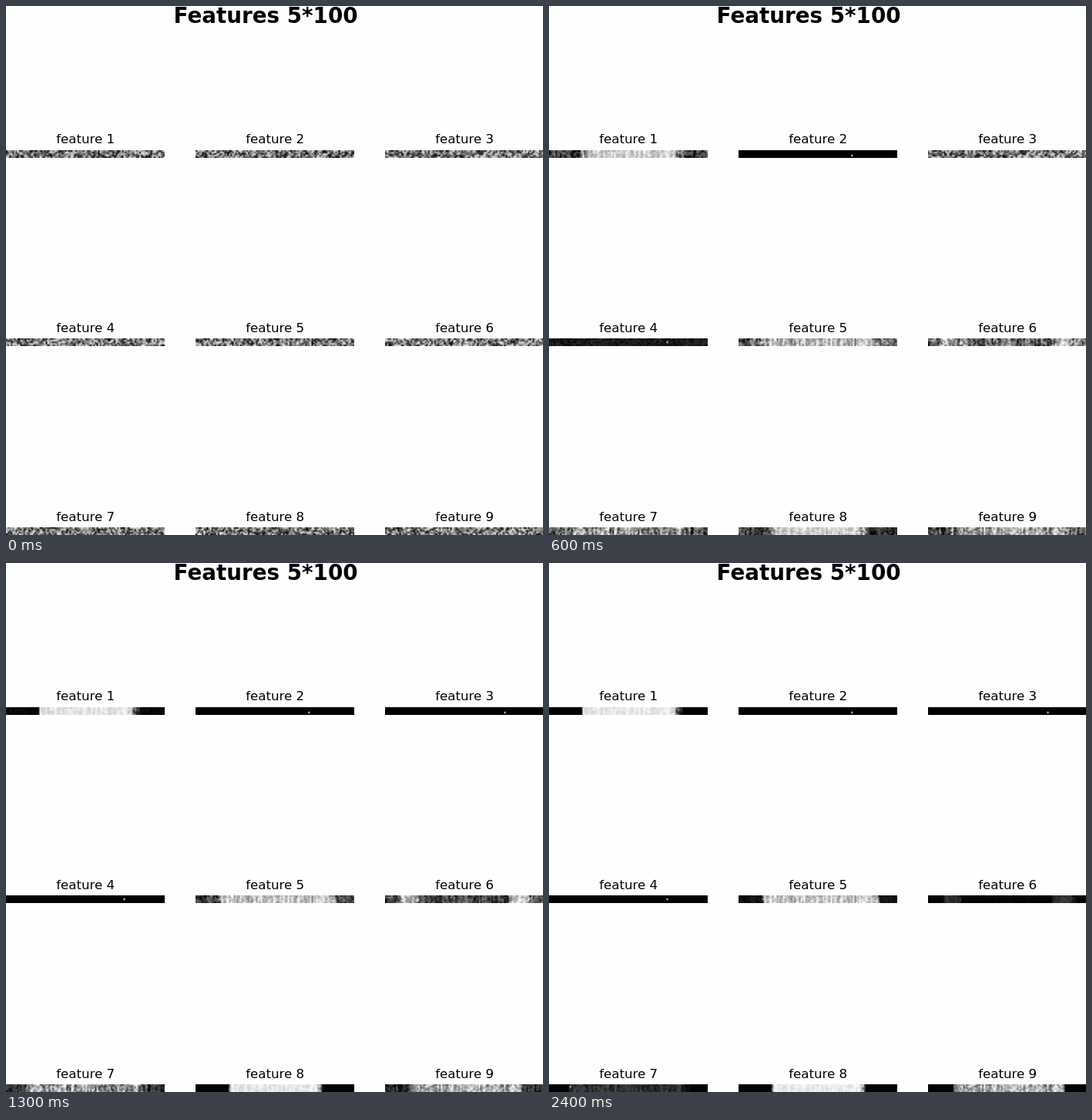
An HTML page with a canvas for the animation above (2500 ms loop, 697 by 686 pixels).

```html
<!DOCTYPE html>
<html lang="en">
<head>
<meta charset="utf-8">
<title>Features 5*100</title>
<style>
  html, body { margin: 0; width: 100%; height: 100%; overflow: hidden; background: #fefefe; }
  canvas, svg { position: absolute; left: 0; top: 0; width: 697px; height: 686px; }
  text { font: 16.667px "DejaVu Sans", sans-serif; text-anchor: middle; fill: #000; }
  .title { font-size: 27.778px; font-weight: bold; }
</style>
</head>
<body>
<canvas id="stage" width="697" height="686"></canvas>
<svg id="labels" viewBox="0 0 697 686"><text class="title" x="337.1" y="22">Features 5*100</text></svg>
<script>
const COLS = 100, ROWS = 5, STEPS = 25, STEP_MS = 100;
const START = 0.48, PALE = 0.8;

// bands: bright column ranges [from, to, right fade]; peak: their final level
// clear: step at which the surroundings reach black
// squeeze: steps over which one outlier flattens all other cells
// spot: the outlier's column and row; flip: step at which it turns from dark to bright
const features = [
  { bands: [[20.5, 80, 8]], peak: 0.92, clear: 14 },
  { squeeze: [1, 4.3], spot: [71, 3], flip: 5 },
  { squeeze: [6, 12], spot: [75, 3] },
  { squeeze: [2, 7], spot: [74, 2] },
  { bands: [[15, 88, 2]], peak: 0.78, clear: 28 },
  { bands: [[10, 20, 1], [78, 91, 4]], peak: 0.75, clear: 28, squeeze: [15, 27] },
  { bands: [[12, 85, 10]], peak: 0.6, clear: 22, squeeze: [15, 28], spot: [13, 1] },
  { bands: [[21, 78, 3]], peak: 0.93, clear: 12 },
  { bands: [[15.5, 85, 1]], peak: 0.68, clear: 21 }
];

function random(seed) {
  return () => {
    seed = (seed + 0x6D2B79F5) | 0;
    let t = Math.imul(seed ^ (seed >>> 15), 1 | seed);
    t = (t + Math.imul(t ^ (t >>> 7), 61 | t)) ^ t;
    return ((t ^ (t >>> 14)) >>> 0) / 4294967296;
  };
}

const clamp = (v, low = 0, high = 1) => Math.max(low, Math.min(high, v));
const mix = (a, b, t) => a + (b - a) * t;
const stripLeft = i => 246 * (i % 3);
const gridRow = i => Math.floor(i / 3);

const labels = document.getElementById("labels");
features.forEach((f, i) => {
  const rnd = random(101 + i * 37);
  const noise = n => Array.from({ length: n }, () => rnd() * 2 - 1);
  f.cells = noise(COLS * ROWS);
  f.columns = noise(COLS);

  const label = document.createElementNS("http://www.w3.org/2000/svg", "text");
  label.setAttribute("x", stripLeft(i) + 103.2);
  label.setAttribute("y", 178 + 245 * gridRow(i));
  label.textContent = "feature " + (i + 1);
  labels.append(label);
});

const ctx = document.getElementById("stage").getContext("2d");
const strip = document.createElement("canvas");
strip.width = COLS;
strip.height = ROWS;
const stripCtx = strip.getContext("2d");
const image = stripCtx.createImageData(COLS, ROWS);

// How far column x lies inside the bright bands, whose edges sharpen with time.
function bandWeight(bands, x, step) {
  const soft = mix(24, 1, clamp(step / 9));
  return Math.max(...bands.map(([from, to, fade]) =>
    clamp((x - from) / soft + 0.5) * clamp((to - x) / Math.max(soft, fade) + 0.5)));
}

function drawFeature(f, i, step) {
  const { bands, peak, clear, squeeze, spot, flip = 0 } = f;
  const inside = bands && mix(peak, START, Math.exp(-step / 4));
  const outside = bands && START * clamp(1 - step / clear);
  const stripes = bands ? 0.45 * clamp(step / 5) : 0;
  const flat = squeeze ? clamp((step - squeeze[0]) / (squeeze[1] - squeeze[0])) : 0;
  const rest = step < flip ? PALE : 0;

  for (let n = 0; n < COLS * ROWS; n++) {
    const x = n % COLS, y = Math.floor(n / COLS);
    const mean = bands ? mix(outside, inside, bandWeight(bands, x, step)) : START;
    const grain = clamp(mix(f.cells[n], f.columns[x], stripes) * (1 + stripes), -1, 1);
    let value = mix(mean + Math.min(mean, 1 - mean) * grain, rest, flat);
    if (spot && flat > 0.6 && x === spot[0] && y === spot[1]) value = rest ? 0 : 1;
    const p = n * 4;
    image.data.fill(Math.round(value * 254), p, p + 3);
    image.data[p + 3] = 255;
  }
  stripCtx.putImageData(image, 0, 0);
  ctx.drawImage(strip, stripLeft(i), Math.floor(187 + 244.5 * gridRow(i)), 206, 10);
}

let shown = -1;
function tick() {
  const step = Math.floor(performance.now() / STEP_MS) % STEPS;
  if (step !== shown) {
    shown = step;
    features.forEach((f, i) => drawFeature(f, i, step));
  }
  requestAnimationFrame(tick);
}
tick();
</script>
</body>
</html>
```
